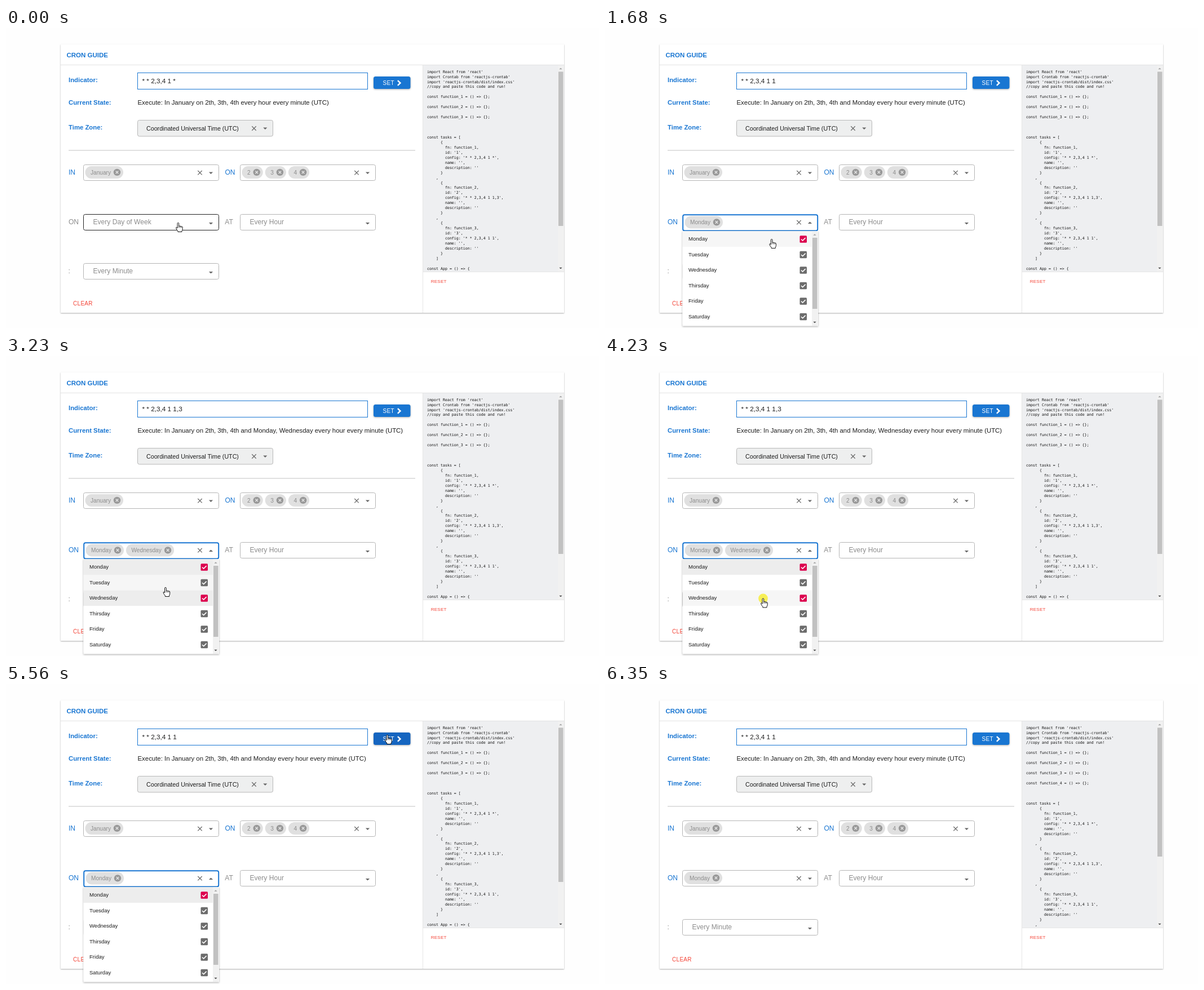
Write an HTML page that moves like this. It is 1052 by 532 pixels and loops after 6.87 s.

```html
<!DOCTYPE html>
<html lang="en">
<head>
<meta charset="utf-8">
<title>Cron guide</title>
<style>
html, body { margin: 0; width: 100%; height: 100%; overflow: hidden; background: #fefefe; }
svg { display: block; font-family: "Liberation Sans", Arial, sans-serif; }
text { white-space: pre; }
.code { font-family: "DejaVu Sans Mono", monospace; font-size: 6.645px; fill: #111; }
.card { filter: drop-shadow(0 1px 1px rgba(0, 0, 0, .32)); }
.popup { filter: drop-shadow(0 1px 1.5px rgba(0, 0, 0, .35)); }
.button { filter: drop-shadow(0 1.5px 1.5px rgba(0, 0, 0, .32)); }
</style>
</head>
<body>
<svg id="stage" width="1052" height="532" viewBox="0 0 1052 532"></svg>
<script>
const LOOP = 6870;
const BLUE = '#1976d2', RED = '#f44336', GREY = '#8c8c8c', INK = '#1c1c1c';
const DAYS = ['Monday', 'Tuesday', 'Wednesday', 'Thirsday', 'Friday', 'Saturday'];
const stage = document.getElementById('stage');

// Pointer moves: start, end, number of steps, target x, target y
const START = [305.5, 345.5];
const MOVES = [
  [760, 1070, 5, 300, 367.5], [1150, 1300, 3, 297, 369.5],
  [1630, 2310, 10, 284.5, 420.5], [2680, 2900, 4, 283, 409],
  [3050, 3230, 3, 283, 410.5], [3290, 3690, 6, 282, 441],
  [3780, 3780, 1, 281, 447], [4000, 4150, 3, 280.5, 430],
  [4450, 5480, 14, 676.5, 90.5], [5790, 6270, 7, 968, 524]
];
const CLICKS = [[380, 530], [1300, 1450], [2380, 2530], [4230, 4380], [5640, 5710]];

function pointerAt(t) {
  let [x, y] = START;
  for (const [from, to, n, tx, ty] of MOVES) {
    if (t < from) break;
    const step = Math.min(n, Math.floor((t - from) / (to - from || 1) * (n - 1)) + 1);
    let p = step / n;
    if (n > 12) p = p * p * (3 - 2 * p);
    x += (tx - x) * p;
    y += (ty - y) * p;
  }
  return { x, y };
}

const rect = (x, y, w, h, fill, more = '') =>
  `<rect x="${x}" y="${y}" width="${w}" height="${h}" fill="${fill}" ${more}/>`;
const text = (x, y, size, fill, s, more = '') =>
  `<text x="${x}" y="${y}" font-size="${size}" fill="${fill}" ${more}>${s.replace(/>/g, '&gt;')}</text>`;
const path = (d, stroke, width, more = 'fill="none"') =>
  `<path d="${d}" stroke="${stroke}" stroke-width="${width}" ${more}/>`;
const bold = (x, y, size, s) => text(x, y, size, BLUE, s, 'font-weight="bold"');
const cross = (x, y, r, color, width) =>
  path(`M${x - r} ${y - r}l${2 * r} ${2 * r}m0 ${-2 * r}l${-2 * r} ${2 * r}`, color, width);
const triangle = (x, y, up, color = '#666', r = 3.6) =>
  `<path d="M${x - r} ${y + (up ? r / 2 : -r / 2)}h${2 * r}l${-r} ${up ? -r : r}z" fill="${color}"/>`;

function chip(x, y, label, textWidth) {
  const w = textWidth + 31.5, cx = x + w - 11, cy = y + 10.9;
  return rect(x, y, w, 22, '#e0e0e0', 'rx="11"') +
    text(x + 9.5, y + 14.9, 10.15, GREY, label) +
    `<circle cx="${cx}" cy="${cy}" r="6.2" fill="#989898"/>` + cross(cx, cy, 2.3, '#e4e4e4', 1.4);
}

const inside = (p, x, y, w, h) => p.x > x && p.x < x + w && p.y > y && p.y < y + h;

// A select box with either a placeholder or chips given as [label, text width]
function field(x, y, pointer, placeholder, chips, open) {
  const hover = inside(pointer, x, y, 240, 28), full = chips.length > 0;
  let out = open
    ? rect(x + .7, y + .7, 239, 28.4, '#fff', `rx="3" stroke="${BLUE}" stroke-width="2"`)
    : rect(x, y, 240, 28, '#fff', `rx="3" stroke="${hover ? '#222' : '#b5b5b5'}"`);
  let left = x + (open ? 4 : 3);
  for (const [label, width] of chips) {
    out += chip(left, y + (open ? 3 : 2.5), label, width);
    left += width + 35.5;
  }
  if (full) out += cross(x + 206.5, y + 14.2, 3.7, '#6b6b6b', 1.3);
  else out += text(x + (open ? 17.5 : 17), y + 17.5, 12.1, GREY, placeholder);
  return out + triangle(x + 226, y + (full ? 14.7 : 16.2), open);
}

function scrollbar(x, top, bottom, thumbTop, thumbEnd) {
  return rect(x, top, 10.5, bottom - top, '#f1f1f1') +
    rect(x + 1, thumbTop, 8.5, thumbEnd - thumbTop, '#c1c1c1') +
    triangle(x + 5, top + 5.5, true, '#a0a0a0', 2.6) +
    triangle(x + 5, bottom - 6, false, '#444', 2.6);
}

function codeLines(count) {
  const configs = ['*', '1,3', '1', '1'].slice(0, count);
  const lines = ["import React from 'react'", "import Crontab from 'reactjs-crontab'",
    "import 'reactjs-crontab/dist/index.css'", '//copy and paste this code and run!', ''];
  configs.forEach((c, i) => lines.push(`const function_${i + 1} = () => {};`, ''));
  lines.push('', '', 'const tasks = [');
  configs.forEach((c, i) => {
    if (i) lines.push('    ,');
    lines.push('      {', `        fn: function_${i + 1},`, `        id: '${i + 1}',`,
      `        config: '* * 2,3,4 1 ${c}',`, "        name: '',", "        description: ''", '      }');
  });
  lines.push('    ]', '', 'const App = () => {', '  return (');
  return lines;
}

function codePanel(count) {
  const lines = codeLines(count).slice(0, 41)
    .map((s, i) => `<text class="code" x="747" y="${79.6 + i * 8.95}">${s.replace(/>/g, '&gt;')}</text>`);
  return rect(740, 66, 250, 366.5, '#eeeff1') +
    `<clipPath id="panel">${rect(740, 66, 250, 366.5, '#000')}</clipPath>` +
    `<g clip-path="url(#panel)">${lines.join('')}</g>` +
    scrollbar(979, 66.5, 432, 77.5, count > 3 ? 306 : 351) +
    path('M739.5 66V505M740 432.5H990', '#e6e6e6', 1) +
    text(753.7, 451.7, 8, RED, 'RESET', 'letter-spacing=".25"');
}

function popup(days, pointer) {
  const rows = DAYS.map((day, i) => {
    const y = 360.5 + 27.5 * i, on = days.includes(day);
    const fill = inside(pointer, 138, y, 229, 27.5) ? '#f6f6f6' : on ? '#ededed' : '#fff';
    return rect(137.5, y, 230, 27.5, fill) + text(148, y + 16.9, 9.56, INK, day) +
      rect(345.5, y + 7.8, 12.5, 12.5, on ? '#dc004e' : '#6c6c6c', 'rx="1.5"') +
      path(`M348 ${y + 14}l2.6 2.6l5-5`, '#fff', 1.5);
  });
  return rect(137.5, 360, 240.5, 168.5, '#fff', 'class="popup"') + rows.join('') +
    scrollbar(367, 361, 528, 372, 498);
}

function hand({ x, y }) {
  const outline = 'M-1.4 9.5V1.2a1.3 1.3 0 0 1 2.6 0V5.8q1.3-.8 2.3.3q1.4-.7 2.2.5q2-.4 2 1.3v3' +
    'q0 2-1.2 3.6v1.5H-.6v-1.5q-2-2-3.2-5q-.4-1.5.8-1.6q.8 0 1.6 1.6z';
  return `<g transform="translate(${x} ${y})">` +
    path(outline, '#111', 1, 'fill="#fff" stroke-linejoin="round"') +
    path('M1.2 5.8v3M3.5 6.1v2.8M5.7 6.6v2.3', '#111', .8) + '</g>';
}

const arrow = ({ x, y }) => `<g transform="translate(${x} ${y})">` +
  path('M0 0v12l2.8-2.7 1.8 4.2 1.8-.8-1.8-4.1h3.9z', '#111', .9, 'fill="#fff"') + '</g>';

function scene(t) {
  const p = pointerAt(t), open = t >= 380 && t < 5640;
  const days = t < 1450 ? [] : t >= 2530 && t < 4380 ? ['Monday', 'Wednesday'] : ['Monday'];
  const cron = days.map(d => DAYS.indexOf(d) + 1).join(',') || '*';
  const when = days.length ? ' and ' + days.join(', ') : '';
  const chips = days.map(d => [d, d === 'Monday' ? 36 : 53.6]);
  const onButton = inside(p, 652, 86, 65, 22);

  let out = rect(97, 29, 893, 476, '#fff', 'class="card"') +
    bold(107.5, 51.6, 11.5, 'CRON GUIDE') + path('M97 65.5H990', '#e3e3e3', 1) +
    codePanel(t >= 5710 ? 4 : 3) +
    bold(111, 96.1, 11.35, 'Indicator:') + bold(111, 136.1, 11.35, 'Current State:') +
    bold(111, 179.5, 11.35, 'Time Zone:') +
    rect(233.5, 79.5, 408, 29, '#fff', `stroke="${BLUE}"`) +
    text(241.5, 97.6, 11.75, INK, '* * 2,3,4 1 ' + cron) +
    text(233.5, 136, 11.4, INK,
      `Execute: In January on 2th, 3th, 4th${when} every hour every minute (UTC)`) +
    rect(652, 86, 65.5, 22, onButton ? '#1565c0' : BLUE, 'rx="3.5" class="button"') +
    text(668.5, 101, 10, '#fff', 'SET', 'letter-spacing=".3"') +
    path('M694.9 93.2l4.6 4.3l-4.6 4.3', '#fff', 2.4) +
    rect(233.5, 163.5, 240, 28.5, '#eeefef', 'rx="3" stroke="#b8b8b8"') +
    text(249, 181.6, 10.69, INK, 'Coordinated Universal Time (UTC)') +
    cross(440, 178, 3.7, '#6b6b6b', 1.3) + triangle(459.8, 178.3) +
    path('M111 217H726', '#d6d6d6', 1.4);

  const dayColor = days.length ? BLUE : open ? INK : GREY;
  out += text(111, 260.2, 12.05, BLUE, 'IN') + text(388.5, 260.2, 12.05, BLUE, 'ON') +
    text(111, 347.8, 12.05, dayColor, 'ON') + text(388.3, 347.8, 12.05, GREY, 'AT') +
    text(110.5, 435.3, 12.05, GREY, ':') +
    field(137.5, 242.5, p, '', [['January', 36]]) +
    field(415.5, 242.5, p, '', ['2', '3', '4'].map(n => [n, 5.7])) +
    field(137.5, 330.5, p, 'Every Day of Week', chips, open) +
    field(415.5, 330.5, p, 'Every Hour', []) +
    field(137.5, 417.5, p, 'Every Minute', []) +
    text(119, 492.3, 10, RED, 'CLEAR', 'letter-spacing=".3"');
  if (open) out += popup(days, p);

  if (t < 6350) {
    if (CLICKS.some(([a, b]) => t >= a && t < b))
      out += `<circle cx="${p.x}" cy="${p.y}" r="8.4" fill="#f8ee30" opacity=".8"/>`;
    const clickable = onButton || open && inside(p, 137, 330, 230, 199) ||
      [[137.5, 242.5], [415.5, 242.5], [137.5, 330.5], [415.5, 330.5]]
        .some(([x, y]) => inside(p, x, y, 240, 28));
    out += clickable ? hand(p) : arrow(p);
  }
  return out;
}

let shown = '', start;
function frame(now) {
  start ??= now;
  const next = scene((now - start) % LOOP);
  if (next !== shown) stage.innerHTML = shown = next;
  requestAnimationFrame(frame);
}
requestAnimationFrame(frame);
</script>
</body>
</html>
```
